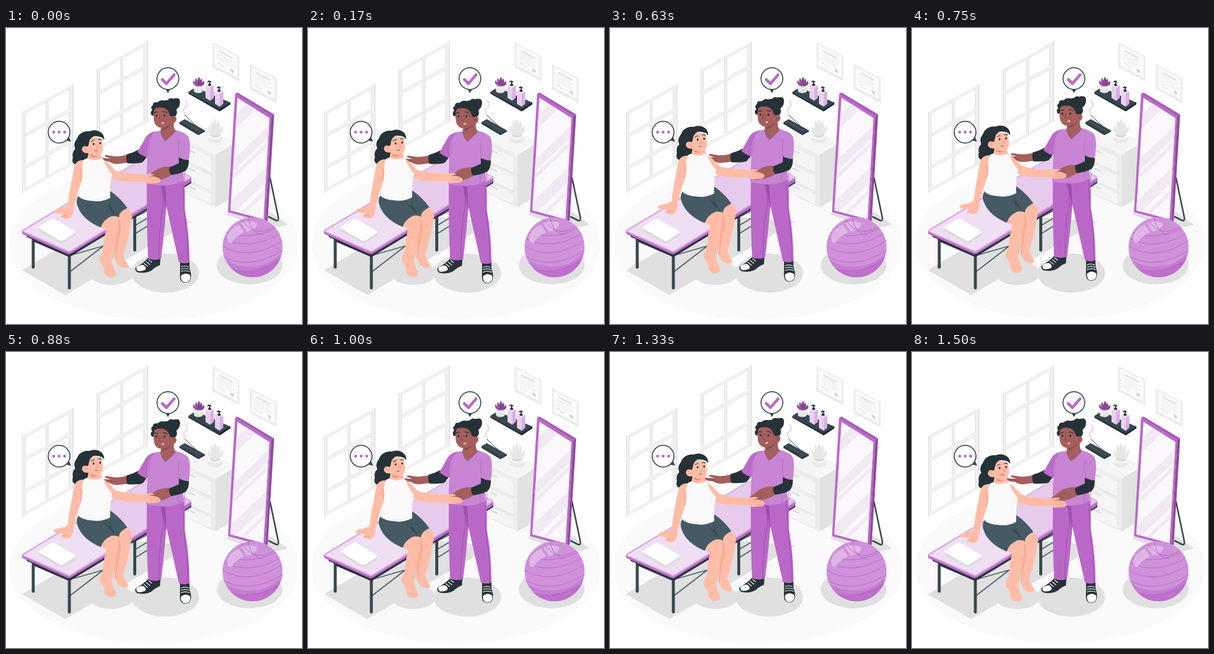
An HTML page with a canvas that plays this animation: 500x500 px, repeating every 1.54 s.

```html
<!DOCTYPE html>
<html lang="en">
<head>
<meta charset="utf-8">
<title>Physiotherapy session</title>
<style>
html, body { margin: 0; width: 100%; height: 100%; overflow: hidden; background: #fff; }
canvas { display: block; width: 100vw; height: 100vh; }
</style>
</head>
<body>
<canvas id="stage" width="500" height="500"></canvas>
<script>
const LOOP = 1540;
const stage = document.getElementById('stage').getContext('2d');
const roomCanvas = document.createElement('canvas');
roomCanvas.width = roomCanvas.height = 500;
let ctx = roomCanvas.getContext('2d');

const INK = '#263238', SLATE = '#37474f', STEEL = '#455a64';
const PURPLE = '#ba68c8', MAUVE = '#c785d3', PLUM = '#9a4fa8', LILAC = '#e6cbec';
const PEACH = '#ffbda7', CORAL = '#eb8f78', BROWN = '#a55f5c', UMBER = '#7d3f40';
const SHADE = '#e0e0e0';

const fill = (color, d) => { ctx.fillStyle = color; ctx.fill(new Path2D(d)); };
const line = (color, width, d) => {
  ctx.strokeStyle = color;
  ctx.lineWidth = width;
  ctx.stroke(new Path2D(d));
};
const oval = (color, x, y, rx, ry = rx, turn = 0) => {
  ctx.fillStyle = color;
  ctx.beginPath();
  ctx.ellipse(x, y, rx, ry, turn, 0, 7);
  ctx.fill();
};
const rect = (color, x, y, w, h) => { ctx.fillStyle = color; ctx.fillRect(x, y, w, h); };
// Draws on an isometric wall whose horizontals have the given slope.
const onWall = (x, y, slope, draw) => {
  ctx.save();
  ctx.transform(1, slope, 0, 1, x, y);
  draw();
  ctx.restore();
};

function drawWindow(x, y) {
  onWall(x, y, -0.555, () => {
    rect('#f1f1f1', 0, 0, 87, 137);
    for (const px of [6, 45]) {
      for (const [py, h] of [[6, 32], [45, 47], [99, 32]]) {
        rect('#e6e6e6', px - 1.5, py - 1, 37, h + 1.5);
        rect('#fff', px, py, 34, h);
      }
    }
    rect('#e4e4e4', 0, 0, 1.5, 137);
    rect('#e4e4e4', 85, 0, 2, 137);
  });
}

function drawCertificate(x, y) {
  onWall(x, y, 0.52, () => {
    rect('#e6e6e6', 0, 0, 45, 42);
    rect('#f0f0f0', 1, 0, 43, 40);
    rect('#fafafa', 3.5, 3, 38, 34.5);
    rect('#dedede', 11, 8, 23, 2.5);
    for (let i = 0; i < 4; i++) rect('#e8e8e8', 8, 14 + i * 3.5, 29 - (i % 2) * 4, 1);
    line('#dcdcdc', 1, 'M9 31q3-4 5 0t6-1');
    oval('#d6d6d6', 33, 31, 3);
  });
}

function drawCabinet() {
  fill('#ededed', 'M297 187L354 214V303L297 272Z');
  fill('#e2e2e2', 'M354 214L383 196V286L354 303Z');
  fill('#f5f5f5', 'M297 187L326 165L384 190L354 214Z');
  for (const y of [196, 227, 257]) {
    const h = y > 250 ? 19 : 26;
    fill('#e3e3e3', `M299 ${y}L348 ${y + 23}V${y + 24 + h}L299 ${y + 1 + h}Z`);
    fill('#f5f5f5', `M299 ${y}L347 ${y + 23}V${y + 22 + h}L299 ${y + h}Z`);
    line('#d9d9d9', 2, `M308 ${y + 10}L319 ${y + 15}`);
  }
  fill('#e9e9e9', 'M341 182V191Q353 199 365 191V182Z');
  oval('#f8f8f8', 353, 182, 12, 6);
  oval('#dcdcdc', 353, 181, 9, 4);
  for (const [x, y] of [[342, 165], [347, 156], [353, 153], [359, 157], [365, 165]])
    fill('#e7e7e7', `M350 181Q${x - 5} ${y + 10} ${x} ${y}Q${x + 6} ${y + 10} 357 181Z`);
}

function drawIncense() {
  fill(INK, 'M293 159L325 177L336 173V175L325 181L293 162Z');
  fill(SLATE, 'M293 159L302 154L336 173L325 179Z');
  line('#60737c', 0.8, 'M299 158L328 174');
  line(INK, 1, 'M302 147L322 166');
  line('#ecdcf0', 3, 'M302 144Q297 138 303 134Q309 129 303 123');
}

function drawBottle(x, y) {
  fill('#f1ddf4', `M${x} ${y}L${x + 5} ${y - 4}L${x + 14} ${y}L${x + 8} ${y + 4}Z`);
  fill('#ead0ef', `M${x} ${y}L${x + 8} ${y + 4}V${y + 26}L${x} ${y + 21}Z`);
  fill('#dab0e3', `M${x + 8} ${y + 4}L${x + 14} ${y}V${y + 21}L${x + 8} ${y + 26}Z`);
  oval(INK, x + 7, y - 1, 2.7, 2);
  line(INK, 1.8, `M${x + 7} ${y - 2}V${y - 7}M${x + 4} ${y - 6}L${x + 6} ${y - 7.5}L${x + 9} ${y - 6}`);
}

function drawShelf() {
  fill(INK, 'M308 108L361 136V141L308 111Z');
  fill('#1d272c', 'M361 136L379 125V129L361 141Z');
  fill(SLATE, 'M308 108L320 100L379 126L361 137Z');
  fill('#e5e5e5', 'M316 98L318 108Q325 112 332 108L334 98Z');
  oval('#f7f7f7', 325, 98, 9, 4.5);
  oval('#cfcfcf', 325, 97.5, 7, 3);
  for (const [x, y] of [[317, 88], [321, 84], [326, 82], [330, 85], [334, 89]])
    fill(x % 2 ? '#98509f' : '#8a4496', `M323 98Q${x - 4} ${y + 7} ${x} ${y}Q${x + 4} ${y + 8} 328 98Z`);
  drawBottle(337, 97);
  drawBottle(353, 107);
}

function drawMirror() {
  fill(SHADE, 'M372 315L441 341L476 332L448 312L390 300Z');
  line(SLATE, 2.6, 'M446 253L460 320Q461 327 456 325L444 319');
  fill(PURPLE, 'M387 111L448 149L438 328L375 311Z');
  fill('#904a9e', 'M448 149L453 146L442 325L438 328Z');
  fill('#a75cb5', 'M387 111L391 109L453 146L448 149Z');
  const glass = 'M391 118L445 152L435 323L379 308Z';
  fill('#faf8fb', glass);
  ctx.save();
  ctx.clip(new Path2D(glass));
  for (const [y, w] of [[158, 17], [228, 14], [247, 6], [297, 18], [324, 6]])
    line('#f2e9f4', w, `M365 ${y + 22}L455 ${y - 64}`);
  ctx.restore();
}

function drawBall() {
  oval(SHADE, 411.5, 401, 55.5, 32);
  oval('#c57dd2', 416.5, 370.5, 50.5);
  ctx.save();
  ctx.beginPath();
  ctx.arc(416.5, 370.5, 50.5, 0, 7);
  ctx.clip();
  fill('#cf92da', 'M360 315H470V374Q448 404 411 403Q376 402 362 382Z');
  fill('#be70cc', 'M362 399Q414 428 470 383V425H362Z');
  for (const [y, bend] of [[340, 20], [352, 24], [366, 26], [383, 24], [399, 21]])
    line('#b165c0', 0.9, `M362 ${y}Q410 ${y + bend + 6} 470 ${y - 9}`);
  fill('#dfb5e6', 'M374 358Q371 344 393 332L402 345Q386 353 381 363Q374 363 374 358ZM397 330Q407 324 424 329Q426 339 407 344Z');
  line('#b165c0', 0.9, 'M398 324Q421 356 452 336M409 320Q414 348 434 349');
  ctx.restore();
}

function drawTable() {
  fill(SHADE, 'M27 409L183 316L313 327L100 451Z');
  oval(SHADE, 178, 414, 38, 20);
  oval(SHADE, 269, 414, 57, 33);
  line(STEEL, 1.7, 'M109 384L165 368M109 411L166 367M219 333L258 310M219 319L258 299M219 347L240 334');
  line(SLATE, 5, 'M46 356V404M107 380V439M217.5 311V375');
  fill(INK, 'M34 347L106 379L313 257V262L107 387L47 361V358L35 353Z');
  fill(PURPLE, 'M27 343V345.5Q27 347.5 30 349L104 382Q107 383 110 381L311 261Q314 259 313 253L107 374Z');
  fill('#d7a5e0', 'M27 343Q27 341 31 339L230 220Q239 214 247 219L311 250Q315 252 311 255L110 378Q107 380 103 378L29 345Z');
  fill('#efdff3', 'M29 343L232 221Q239 216 247 220L311 252L107 377Z');
  fill(LILAC, 'M175 255L232 221Q239 216 247 220L311 252L204 317Q174 300 175 255Z');
  fill('#d9d9d9', 'M55 339L94 359V364L56 343ZM94 359L117 345V350L95 364Z');
  fill('#fff', 'M55 338Q54 336 58 334L76 323Q80 321 84 324L115 342Q119 345 114 348L97 359Q93 361 89 358Z');
}

function drawBubble(x, y, tail) {
  fill(SLATE, tail);
  oval(SLATE, x, y, 19.2);
  oval('#fff', x, y, 17.5);
}

function drawRoom() {
  rect('#fff', 0, 0, 500, 500);
  oval('#fafafa', 250, 364, 244, 129);
  drawWindow(27, 142);
  drawWindow(153, 70);
  drawCertificate(349, 24);
  drawCertificate(412, 61);
  drawCabinet();
  drawIncense();
  drawShelf();
  drawMirror();
  drawBall();
  drawTable();
  drawBubble(273.5, 85.5, 'M269.5 103H277.5L273.5 110Z');
  line(PURPLE, 4.8, 'M264 87L271 94L284 79');
  drawBubble(89.7, 176, 'M101 190L110 192L106 183Z');
  for (const x of [80.5, 89.7, 99]) oval(PURPLE, x, 176, 2.4);
}

function drawTherapist() {
  // Shoes
  fill(INK, 'M241 388H261L260 401Q252 404 246 410Q235 416 222 413Q217 410 219 405Q232 398 241 388Z');
  fill('#fff', 'M220 405Q227 400 232 401Q238 405 235 409Q226 413 221 410Z');
  line('#fff', 1.2, 'M233 398L239 403M237 395L243 400M241 392L246 396');
  fill(INK, 'M294 396H310Q309 406 312 413Q314 424 309 429Q301 433 296 428Q293 424 294 412Z');
  fill('#fff', 'M295.5 419Q303 412 311 418Q313 429 303 430Q295 430 295.5 419Z');
  line('#fff', 1.2, 'M296 404Q302 401 308 404M296 408Q302 405 309 408M296 412Q302 409 310 412');

  // Trousers
  fill(PURPLE, 'M238 258H301Q303 282 302 306Q310 350 310 396Q302 400 292 396L271 302Q267 350 262 390Q252 394 240 390Q237 325 238 258Z');
  line(PLUM, 1, 'M262 266Q266 286 270 305M265 272Q268 300 262 320Q258 355 258 390M299 264Q299 310 305 344Q308 370 307 397');
  fill(PLUM, 'M262 266L269 268L271 304Q268 288 262 266Z');

  // Far arm
  fill(BROWN, 'M206 214Q193 218 182 217L169 215Q164 217 171 219L177 221L160 220Q156 222 161 224L174 226Q181 231 190 230L207 228Z');
  line(UMBER, 0.6, 'M161 222L178 223M165 225L180 226');
  fill(INK, 'M224 206Q215 211 204 214Q202 221 205 229Q225 230 231 227Q238 219 242 211Z');
  fill('#bb6bc9', 'M252 175Q240 178 236 185L222 210Q230 217 239 219L247 207Z');

  // Tunic
  fill(MAUVE, 'M252 175L262 174L287 173Q303 177 308 184Q313 194 309 222Q301 225 295 222L301 256Q290 267 262 266Q246 266 237 262L239 215Q238 188 252 175Z');
  line('#b56bc3', 0.8, 'M293 188Q290 204 293 222M240 215L243 194M291 246V262Q291 266 300 264M302 240V262');

  // Head
  fill(BROWN, 'M262 164L284 158Q282 170 287 174Q277 185 269 191Q263 185 261 175Z');
  line(PLUM, 0.8, 'M261 175Q264 187 269 191Q278 185 287 174');
  fill('#8c4b4a', 'M265 169Q273 168 279 161Q276 170 264 173Z');
  oval(INK, 285, 129, 8.5, 10, 0.4);
  oval(INK, 279, 125, 6, 6);
  oval(INK, 289, 125, 5, 6);
  fill(INK, 'M247 149Q242 144 247 139Q243 134 248 131Q248 125 256 126Q261 121 268 123Q276 120 282 128Q291 131 288 139Q291 146 284 151L276 154L262 142Z');
  fill(BROWN, 'M250 140Q248 152 251 161Q255 169 263 169Q273 168 278 160Q287 163 288 154Q287 147 281 150Q277 150 276 146Q275 141 271 138Q266 134 258 135Q251 135 250 140Z');
  for (const x of [254, 267.5]) oval(INK, x, 148.5, 1.5, 2);
  line(INK, 1.2, 'M250 144Q253 141 256 143M265 142Q269 141 272 144');
  line(UMBER, 0.9, 'M260 148L258 155L262 156M284 153Q281 153 282 157');
  fill('#fff', 'M262.5 160.5Q265 161 267 159.5Q266.5 163 263.5 162.5Z');

  // Near arm
  fill(BROWN, 'M280 235Q264 234 253 240L237 252Q232 255 238 255L249 251L240 256Q242 260 252 258Q265 258 281 248Z');
  line(UMBER, 0.6, 'M249 250L258 246M245 256L258 251');
  fill(INK, 'M292 219Q301 224 309 223Q309 237 303 242Q293 247 279 249Q274 242 276 236L292 229Z');
}

function drawWoman() {
  // Hair behind the neck
  fill(INK, 'M123 184Q112 194 117 204Q111 210 113 219Q110 229 119 231Q129 235 137 225L143 206Z');

  // Legs
  fill(PEACH, 'M185 310Q199 300 209 308Q215 315 212 324Q207 356 198 384Q201 393 206 400Q208 405 201 406Q191 405 187 397Q182 390 184 380L188 334Z');
  line(CORAL, 0.8, 'M191 324Q195 341 189 358L184 390');
  fill(PEACH, 'M159 335Q167 320 182 317Q194 320 191 333Q187 362 178 390Q180 404 186 413Q187 421 179 422Q169 421 166 414Q167 404 159 396Q156 388 163 380Q165 358 169 341Z');
  line(CORAL, 0.8, 'M190 326Q193 338 188 350Q185 374 179 390');
  fill(STEEL, 'M123 283Q117 291 121 301Q129 324 160 337Q164 324 178 318Q187 317 191 320Q190 311 205 304Q194 288 177 276Z');
  fill(SLATE, 'M164 294L174 303L176 296L173 294L185 316Q178 310 164 294Z');

  // Supporting arm
  fill(PEACH, 'M133 223Q118 222 115 235L107 278L104 300Q97 305 85 306Q78 309 82 313Q91 312 97 315L93 319Q101 325 109 321Q115 313 114 302L128 256Z');
  line(CORAL, 0.8, 'M93 319Q99 315 104 318M126 237Q128 250 126 261');

  // Neck, outstretched arm and top
  fill(PEACH, 'M139 207L160 213L163 221Q172 226 185 241Q211 248 236 247Q247 245 251 248L239 251Q253 249 260 255Q264 259 256 262L241 263Q233 259 224 260Q193 261 179 254L132 226Q140 222 139 207Z');
  line(CORAL, 0.7, 'M241 254L258 256M243 258L257 259');
  fill('#fafafa', 'M132 222L137 220Q148 226 162 220L165 223Q168 234 179 247Q175 262 176 287Q161 295 145 292Q130 291 123 285Q125 260 132 251Q125 236 132 222Z');
  line('#ececec', 0.8, 'M170 242Q174 251 172 257M127 286Q144 294 174 287');
  fill(CORAL, 'M142 212Q149 216 156 216Q150 220 143 217Z');

  // Head
  fill(PEACH, 'M139 188Q148 181 162 187L164 201Q164 212 157 216Q145 217 140 211Q130 213 128 205Q128 199 135 199Z');
  fill(INK, 'M118 204Q117 189 123 181Q131 173 141 174.5Q150 171 157 174.5Q166 178 166 189L162 185Q155 182 148 183Q141 186 140 195Q139 202 136 200Q128 197 128 207Z');
  oval(INK, 148, 196, 1.4, 1.9);
  oval(INK, 159, 194.5, 1.4, 1.9);
  line(INK, 1.1, 'M144 192Q146 189 149 190M156 188.5Q159 187 161 189');
  line(CORAL, 1, 'M154 197L157 202L153 203M132 203Q135 202 135 207');
  line('#8f3e39', 1, 'M150 207Q152 209 155 207');
}

const swing = (time, period, peak) => Math.cos(2 * Math.PI * (time - peak) / period);
const shifted = (dy, draw) => {
  ctx.save();
  ctx.translate(0, dy);
  draw();
  ctx.restore();
};

function render() {
  const time = performance.now() % LOOP;
  ctx.drawImage(roomCanvas, 0, 0);
  // The therapist sways more slowly than the loop, so the wrap is a hard cut.
  shifted(-3.7 + 4.2 * swing(time, 2040, 230), drawTherapist);
  shifted(-4 + 4 * swing(time, LOOP, -15), drawWoman);
  requestAnimationFrame(render);
}

ctx.lineCap = ctx.lineJoin = stage.lineCap = stage.lineJoin = 'round';
drawRoom();
ctx = stage;
render();
</script>
</body>
</html>
```
